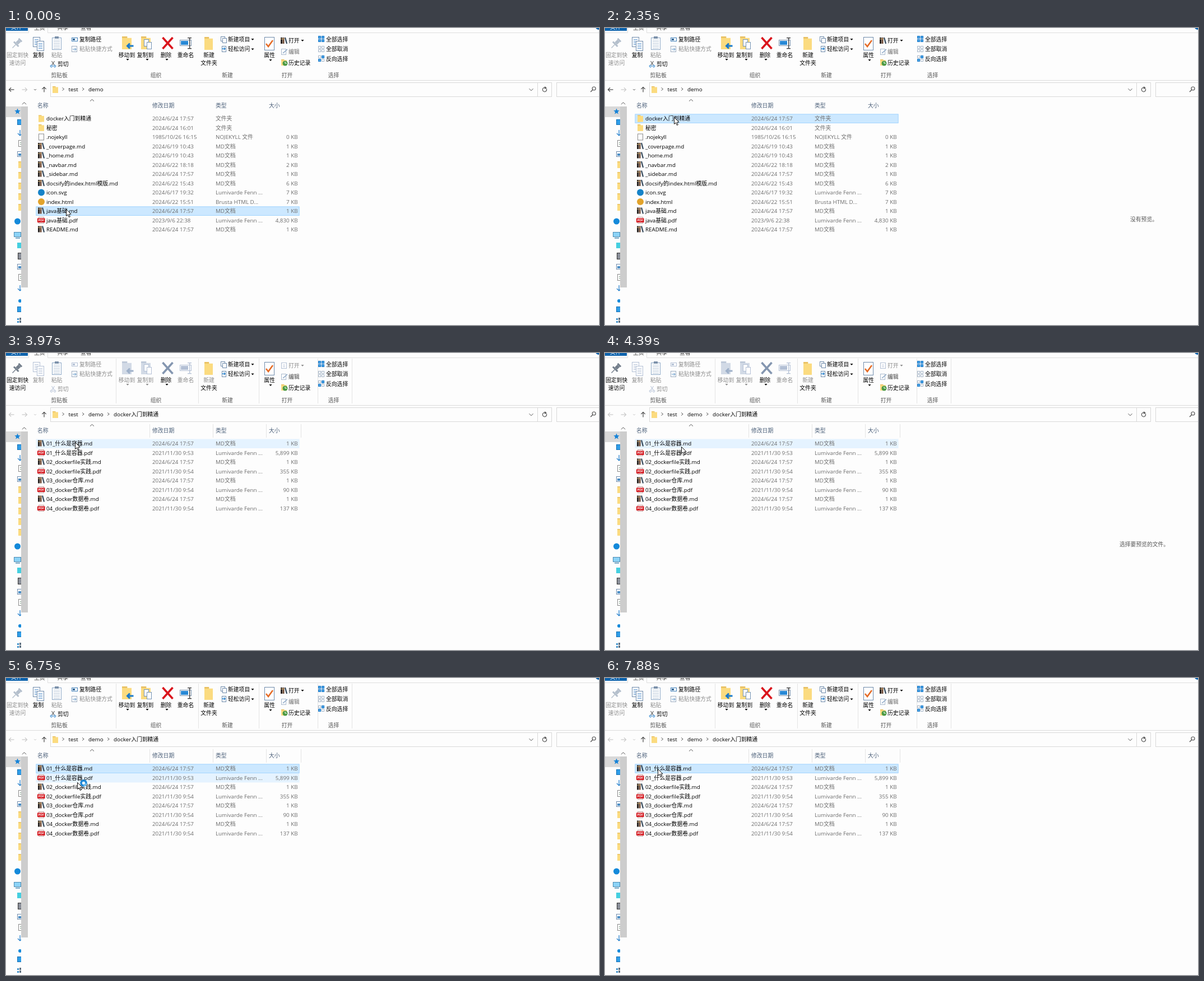
Animation of 1058 by 530 pixels, one loop 8000 ms. Source, as an HTML page with a canvas:

```html
<!DOCTYPE html>
<html lang="zh">
<head>
<meta charset="utf-8">
<style>
html, body { margin: 0; width: 100%; height: 100%; overflow: hidden; background: #fdfdfd; }
canvas { display: block; }
</style>
</head>
<body>
<canvas id="stage" width="1058" height="530"></canvas>
<script>
const ctx = document.getElementById('stage').getContext('2d');
const LOOP = 8000, STEP = 120, ROW = 16.5, TOP = 153.5;
const FONT = '9.8px "Open Sans", "Noto Sans CJK SC", "Noto Sans CJK", sans-serif';
const PAPER = '#fdfdfd', INK = '#000', GRAY = '#6d6d6d', PALE = '#8c8c8c', EDGE = '#6f8bab';
const BLUE = '#1979ca', YELLOW = '#fbdb80', GOLD = '#e9c162', FADED = '#b3c0d5';

// Pointer moves: start time, number of equal steps, end x, end y
const moves = [
  [250, 2, 129, 331], [540, 4, 94, 324], [1060, 2, 111, 326], [1720, 3, 124, 187], [2110, 3, 123, 159],
  [4150, 3, 136, 167], [4520, 1, 185, 164], [4670, 4, 119, 160], [5590, 3, 125, 161], [5950, 2, 130, 181],
  [6750, 3, 121, 197], [7370, 1, 120, 207], [7630, 3, 94, 162]
];

const kinds = {
  dir: '文件夹', blank: 'NOJEKYLL 文件', md: 'MD文档',
  svg: 'Lumivarde Fenn ...', pdf: 'Lumivarde Fenn ...', html: 'Brusta HTML D...'
};
const parse = s => s.trim().split('\n').map(row => row.trim().split('|'));
const demoFiles = parse(`
  dir|docker入门到精通|2024/6/24 17:57|
  dir|秘密|2024/6/24 16:01|
  blank|.nojekyll|1985/10/26 16:15|0 KB
  md|_coverpage.md|2024/6/19 10:43|1 KB
  md|_home.md|2024/6/19 10:43|1 KB
  md|_navbar.md|2024/6/22 18:18|2 KB
  md|_sidebar.md|2024/6/24 17:57|1 KB
  md|docsify的index.html模版.md|2024/6/22 15:43|6 KB
  svg|icon.svg|2024/6/17 19:32|7 KB
  html|index.html|2024/6/22 15:51|7 KB
  md|java基础.md|2024/6/24 17:57|1 KB
  pdf|java基础.pdf|2023/9/6 22:38|4,830 KB
  md|README.md|2024/6/24 17:57|1 KB`);
// Each chapter is a note and a PDF
const chapters = parse(`
  01_什么是容器|9:53|5,899 KB
  02_dockerfile实践|9:54|355 KB
  03_docker仓库|9:54|90 KB
  04_docker数据卷|9:54|137 KB`);
const dockerFiles = chapters.flatMap(([name, time, size]) => [
  ['md', name + '.md', '2024/6/24 17:57', '1 KB'],
  ['pdf', name + '.pdf', '2021/11/30 ' + time, size]
]);

function text(s, x, y, color = INK, align = 'left') {
  ctx.font = FONT;
  ctx.textAlign = align;
  ctx.fillStyle = color;
  ctx.fillText(s, x, y + 3.6);
}
function rect(color, x, y, w, h) {
  ctx.fillStyle = color;
  ctx.fillRect(x, y, w, h);
}
function box(fill, stroke, x, y, w, h) {
  rect(fill, x, y, w, h);
  ctx.strokeStyle = stroke;
  ctx.lineWidth = 1;
  ctx.strokeRect(x + .5, y + .5, w - 1, h - 1);
}
function trace(pts) {
  ctx.beginPath();
  for (let i = 0; i < pts.length; i += 2) ctx.lineTo(pts[i], pts[i + 1]);
}
function line(color, width, ...pts) {
  trace(pts);
  ctx.strokeStyle = color;
  ctx.lineWidth = width;
  ctx.stroke();
}
function poly(color, ...pts) {
  trace(pts);
  ctx.closePath();
  ctx.fillStyle = color;
  ctx.fill();
}
function disc(color, x, y, r) {
  ctx.beginPath();
  ctx.arc(x, y, r, 0, 7);
  ctx.fillStyle = color;
  ctx.fill();
}
function arc(color, width, x, y, r, from = 0, to = 7) {
  ctx.beginPath();
  ctx.arc(x, y, r, from, to);
  ctx.strokeStyle = color;
  ctx.lineWidth = width;
  ctx.stroke();
}

const dropMark = (x, y, color) => poly(color, x - 2.5, y - 1, x + 2.5, y - 1, x, y + 2);
const chevron = (x, y) => line('#555', 1, x - 1.5, y - 2.5, x + 1.5, y, x - 1.5, y + 2.5);
const caret = (x, y, d) => line('#555', 1, x - 3.5, y + d, x, y - d, x + 3.5, y + d);
const divider = (x, y, h) => rect('#e4e4e4', x, y, 1, h);
const page = (x, y, w, h, edge = EDGE) => box('#fff', edge, x, y, w, h);
function folder(x, y, w, h, front = YELLOW, back = GOLD) {
  rect(back, x, y, w * .55, h);
  rect(front, x, y + h * .12, w, h * .88);
}
function books(x, y) {
  rect('#2b2624', x, y, 3, 11);
  rect('#6d4a35', x + 3.5, y, 3, 11);
  rect('#d4b06d', x, y + 2, 6.5, 1);
  line('#34495c', 2.2, x + 8, y, x + 11, y + 11);
}
function arrow(x, y, dx, dy, color, width = 1.2) {
  line(color, width, x - 5 * dx, y - 5 * dy, x + 5 * dx, y + 5 * dy);
  line(color, width, x + dx - 4 * dy, y + dy - 4 * dx, x + 5 * dx, y + 5 * dy, x + dx + 4 * dy, y + dy + 4 * dx);
}
function cross(x, y, w, h, color, width) {
  line(color, width, x - w, y - h, x + w, y + h);
  line(color, width, x + w, y - h, x - w, y + h);
}
function ruledPage(x, y, w, h, edge, ink) {
  page(x, y, w, h, edge);
  for (let i = y + 4; i < y + h - 2; i += 3) rect(ink, x + 3, i, w - 6, 1);
}

function fileIcon(kind, y) {
  if (kind === 'dir') folder(58, y - 6, 10, 12);
  else if (kind === 'blank') page(58, y - 6, 10, 12, '#8a8a8a');
  else if (kind === 'md') books(57, y - 6);
  else if (kind === 'pdf') {
    page(58, y - 6, 10, 12, '#c9a0a0');
    rect('#d3161d', 56, y - 3.5, 13.5, 7.5);
    ctx.font = 'bold 5.5px "Open Sans", sans-serif';
    ctx.textAlign = 'center';
    ctx.fillStyle = '#fff';
    ctx.fillText('PDF', 62.8, y + 2.3);
  } else disc(kind === 'svg' ? '#1683c8' : '#e2a32b', 63, y, 6);
}

function tabs() {
  rect('#0d63ad', 0, 0, 39, 5);
  text('文件', 9, -2, '#fff');
  ['主页', '共享', '查看'].forEach((s, i) => text(s, 50 + i * 41.5, -1, '#333'));
  line('#dedede', 1, 0, 8.5, 40.5, 8.5, 40.5, 0);
  line('#dedede', 1, 74.5, 0, 74.5, 8.5, 1058, 8.5);
  disc('#0d63ad', 1057, -2, 5);
}

function pinIcon(color) {
  ctx.save();
  ctx.translate(20, 27);
  ctx.rotate(Math.PI / 4);
  rect(color, -4, -9, 8, 3);
  rect(color, -3, -6, 6, 7);
  rect(color, -6, 1, 12, 3);
  rect(color, -.7, 4, 1.4, 8);
  ctx.restore();
}

function ribbon(t) {
  const off = t >= 3970 && t < 5590;
  const pinned = t >= 2880 && t < 5590;
  const tint = (color, faded = FADED) => off ? faded : color;
  const label = off ? PALE : INK;
  const big = (s, x, color = label, y = 48) => text(s, x, y, color, 'center');

  const edges = [-2, 196, 343, 451, 556, 617];
  if (t >= 3420 && !off && pinned) rect('#f8f9fa', 344, 10, 273, 81);
  ['剪贴板', '组织', '新建', '打开', '选择'].forEach((s, i) => {
    text(s, (edges[i] + edges[i + 1]) / 2 - 2, 84, '#555', 'center');
    if (t >= (i < 2 ? 2880 : 3420)) divider(edges[i + 1], 10, 80);
  });
  rect('#dcdcdc', 0, 93, 1058, 1);

  // clipboard
  const pinLabel = pinned ? INK : PALE;
  pinIcon(pinned ? '#747f8c' : '#b4bfcc');
  big('固定到快', 20.5, pinLabel);
  big('速访问', 20.5, pinLabel, 62);
  for (const i of [0, 7]) ruledPage(48 + i, 16 + i, 13, 18, tint(EDGE), tint('#5b95cf'));
  big('复制', 57.5);
  ruledPage(82, 17, 17, 22, '#8ea9c7', '#b9c8d9');
  rect('#7c91aa', 87, 15, 7, 4);
  big('粘贴', 90.5, PALE);
  cross(84, 63, 2.5, 4, tint('#444'), 1);
  for (const x of [81, 87]) arc(tint(BLUE), 1, x, 68, 1.8);
  text('剪切', 92, 64, label);
  box('#fff', tint('#3c7db8'), 117, 17, 11, 7);
  rect(tint('#285f91'), 119, 19, 4, 3);
  text('复制路径', 131, 20, label);
  page(117, 32, 10, 11, '#9cacc0');
  arrow(122, 38, .6, 0, '#7faad2');
  text('粘贴快捷方式', 131, 37.5, PALE);

  // organise
  for (const x of [207, 241]) folder(x, 15, 17, 23, tint(YELLOW, '#d2dae6'), tint(GOLD, '#bdc8d8'));
  arrow(222, 32, -1.1, 0, tint(BLUE, '#9eb0c9'), 3);
  for (const i of [0, 5]) page(246 + i, 20 + i, 9, 13, tint('#7593b3'));
  cross(288.5, 27, 9, 10, tint('#da151c', '#8496b0'), 3.6);
  box('#fff', tint('#7b93ad'), 310, 21, 21, 11);
  rect(tint('#2989d6'), 312, 23, 13, 7);
  rect(tint('#333'), 327, 17, 1.3, 20);
  for (const y of [17, 36]) rect(tint('#333'), 324, y, 7, 1.3);
  [['移动到', label], ['复制到', label], ['删除', INK], ['重命名', label]].forEach(([s, color], i) => {
    const x = 215.5 + i * 35;
    big(s, x - (i === 1 ? 2 : 0), color);
    if (i < 3) dropMark(x + 1.5, 56, color);
  });

  // new
  folder(354, 16, 15, 23);
  big('新建', 362);
  big('文件夹', 362, INK, 62);
  for (const i of [0, 3]) page(383 + i, 15 + i, 8, 9);
  page(385, 32, 8, 11);
  arrow(388, 37, .6, 0, BLUE);
  ['新建项目', '轻松访问'].forEach((s, i) => {
    text(s, 396, 20 + i * 17.5);
    dropMark(440, 20 + i * 17.5, INK);
  });

  // open
  page(461, 16, 18, 24);
  line('#e46b26', 2.6, 464, 28, 468, 33, 476, 22);
  big('属性', 470, INK);
  dropMark(472, 57, INK);
  if (off) ruledPage(491, 17, 10, 11, FADED, FADED);
  else if (pinned && t >= 3420) folder(491, 17, 11, 11);
  else books(490, 17);
  dropMark(529, 22, label);
  page(491, 37, 9, 11, '#a9b9cd');
  line('#8da8c6', 1.6, 494, 45, 502, 38);
  folder(491, 56, 10, 11);
  disc('#4b9a45', 498, 63, 4.5);
  line('#fff', 1, 498, 60, 498, 63, 501, 63);
  [['打开', label], ['编辑', pinned ? '#444' : GRAY], ['历史记录', INK]].forEach(([s, color], i) => text(s, 504, 22 + i * 20, color));

  // select: all, none, inverse
  ['全部选择', '全部取消', '反向选择'].forEach((s, row) => {
    const y = 20 + row * 17.5;
    for (let i = 0; i < 4; i++) {
      const filled = row === 0 || row === 2 && i % 3 > 0;
      box(filled ? '#4ba3e3' : '#fff', filled ? BLUE : '#a5b5c7', 557 + i % 2 * 6, Math.round(y) - 6 + (i >> 1) * 6, 5, 5);
    }
    text(s, 571, y);
  });
}

function addressBar(inside) {
  arrow(10, 110, -.9, 0, inside ? '#c8c8c8' : '#444');
  arrow(33, 110, .9, 0, '#c8c8c8');
  line(inside ? '#ccc' : '#666', 1, 50, 109, 52, 111, 54, 109);
  arrow(68, 110, 0, -.9, '#444');
  box(PAPER, '#d9d9d9', 79, 97, 895, 26);
  rect('#d9d9d9', 948, 97, 1, 26);
  box(PAPER, '#d9d9d9', 982, 97, 90, 26);
  folder(83, 104, 10, 12);
  const path = ['test', 'demo', ...(inside ? ['docker入门到精通'] : [])];
  let x = 102;
  for (const name of path) {
    chevron(x, 109);
    text(name, x + 9.5, 109);
    x += 18.5 + ctx.measureText(name).width;
  }
  caret(937, 110, -1.8);
  arc('#555', 1.2, 961, 110, 3.6, -.5, 5);
  poly('#555', 961, 104, 965, 107, 961, 109);
  arc('#555', 1.2, 1049, 108, 3);
  line('#555', 1.5, 1047, 110, 1043, 114);
}

const sideIcons = {
  star(y) {
    const points = Array.from({ length: 10 }, (_, i) => {
      const r = i % 2 ? 2.4 : 5.5, a = i * Math.PI / 5 - Math.PI / 2;
      return [20.5 + r * Math.cos(a), y + r * Math.sin(a)];
    });
    poly('#1683d8', ...points.flat());
  },
  screen: y => box('#2e9de8', '#1670b5', 20, y - 5, 8, 10),
  down: y => arrow(25, y, 0, 1, BLUE),
  doc: y => ruledPage(22, y - 6, 10, 12, '#8a8a8a', '#7d9d86'),
  photo(y) {
    page(20, y - 5, 9, 10);
    rect('#4d8fc5', 22, y - 1, 6, 4);
  },
  folder: y => folder(22, y - 6, 9, 12),
  pc(y) {
    box('#8cd3f7', '#4b8bb3', 14, y - 5, 13, 9);
    rect('#4b8bb3', 17, y + 5, 8, 1.5);
  },
  cube: y => rect('#45cfe0', 20, y - 5, 7, 10),
  film: y => box('#8a8f99', '#333', 21, y - 6, 8, 12),
  dot: y => disc('#1389da', 25, y + 4, 3),
  tiles(y) {
    for (const dy of [-3, 2]) {
      rect('#3b8fc9', 20, y + dy, 3, 3);
      rect('#5d6f80', 24, y + dy - 1, 3, 4);
    }
  }
};

function sidebar() {
  rect('#d9d9d9', 0, 140, 27, 19);
  const column = (names, y) => names.split(' ').forEach((name, i) => sideIcons[name](y + i * 19));
  column('star screen down doc photo folder folder folder folder folder', 149);
  disc('#1389da', 20.5, 345, 5.5);
  column('pc cube film photo doc down dot screen tiles', 369);
  rect(PAPER, 27, 127, 12, 403);
  rect('#cdcdcd', 27, 140, 12, 323);
  caret(32.5, 134.5, 1.8);
}

function fileList(files, selected, hovered, ruled) {
  ['名称', '修改日期', '类型', '大小'].forEach((s, i) => {
    const x = [56, 261, 374, 469][i];
    text(s, x, 138, '#4c607a');
    if (ruled && i) divider(x - 5, 127, 24);
  });
  if (ruled) divider(526, 127, 24);
  caret(153.5, 129, 1.6);
  files.forEach(([kind, name, date, size], i) => {
    const top = TOP + i * ROW, y = top + 8;
    if (i === selected) {
      rect('#cce8ff', 53.5, top, 470, ROW);
      ctx.strokeStyle = '#99d1ff';
      ctx.lineWidth = .8;
      ctx.strokeRect(53.9, top + .4, 469.2, ROW - .8);
    } else if (i === hovered) rect('#e5f3ff', 53.5, top, 470, ROW);
    fileIcon(kind, y);
    text(name, 72, y);
    text(date, 261, y, GRAY);
    text(kinds[kind], 374, y, GRAY);
    text(size, 520.5, y, GRAY, 'right');
  });
}

function tooltip(alpha) {
  ctx.globalAlpha = alpha;
  rect('#9b9b9b', 111, 345, 126, 42);
  box('#fff', '#767676', 108, 342, 127, 43);
  ['类型: MD文档', '大小: 48 字节', '修改日期: 2024/6/24 17:57'].forEach((s, i) => text(s, 112, 350 + i * 13.3, '#575757'));
  ctx.globalAlpha = 1;
}

function pointerAt(t) {
  let x = 107, y = 323;
  for (const [start, steps, endX, endY] of moves) {
    if (t < start) break;
    const k = Math.min(1, (Math.floor((t - start) / STEP) + 1) / steps);
    x += (endX - x) * k;
    y += (endY - y) * k;
  }
  return [x, y];
}

function drawPointer(x, y, busy, t) {
  ctx.save();
  ctx.translate(Math.round(x) + .5, Math.round(y) + .5);
  const shape = [0, 0, 0, 12, 2.8, 9.4, 4.8, 14, 6.8, 13.2, 4.8, 8.8, 8.6, 8.6, 0, 0];
  poly('#fff', ...shape);
  line('#111', 1, ...shape);
  if (busy) {
    const turn = Math.floor(t / STEP) * .9;
    disc('#1c86d6', 11, 1, 6.3);
    disc('#e4f4fd', 11, 1, 2.8);
    arc('#7cc8f5', 2.4, 11, 1, 4.6, turn, turn + 1.5);
  }
  ctx.restore();
}

function draw(t) {
  const inside = t >= 3970;
  const [x, y] = pointerAt(t);
  const hovered = Math.floor((y - TOP) / ROW);
  const selected = inside ? (t >= 5440 ? 0 : -1) : (t >= 2350 ? 0 : 10);

  rect(PAPER, 0, 0, 1058, 530);
  tabs();
  ribbon(t);
  addressBar(inside);
  sidebar();
  fileList(inside ? dockerFiles : demoFiles, selected, hovered, t >= 2880);
  if (t >= 2350 && !inside) text('没有预览。', 937, 341, '#555');
  if (t >= 4150 && t < 5440) text('选择要预览的文件。', 918, 341, '#555');
  if (t >= 1330 && t < 2110) tooltip(t < 1460 ? .5 : 1);
  drawPointer(x, y, t >= 6330 && t < 7630, t);
}

const start = performance.now();
function tick() {
  draw((performance.now() - start) % LOOP);
  requestAnimationFrame(tick);
}
tick();
</script>
</body>
</html>
```
